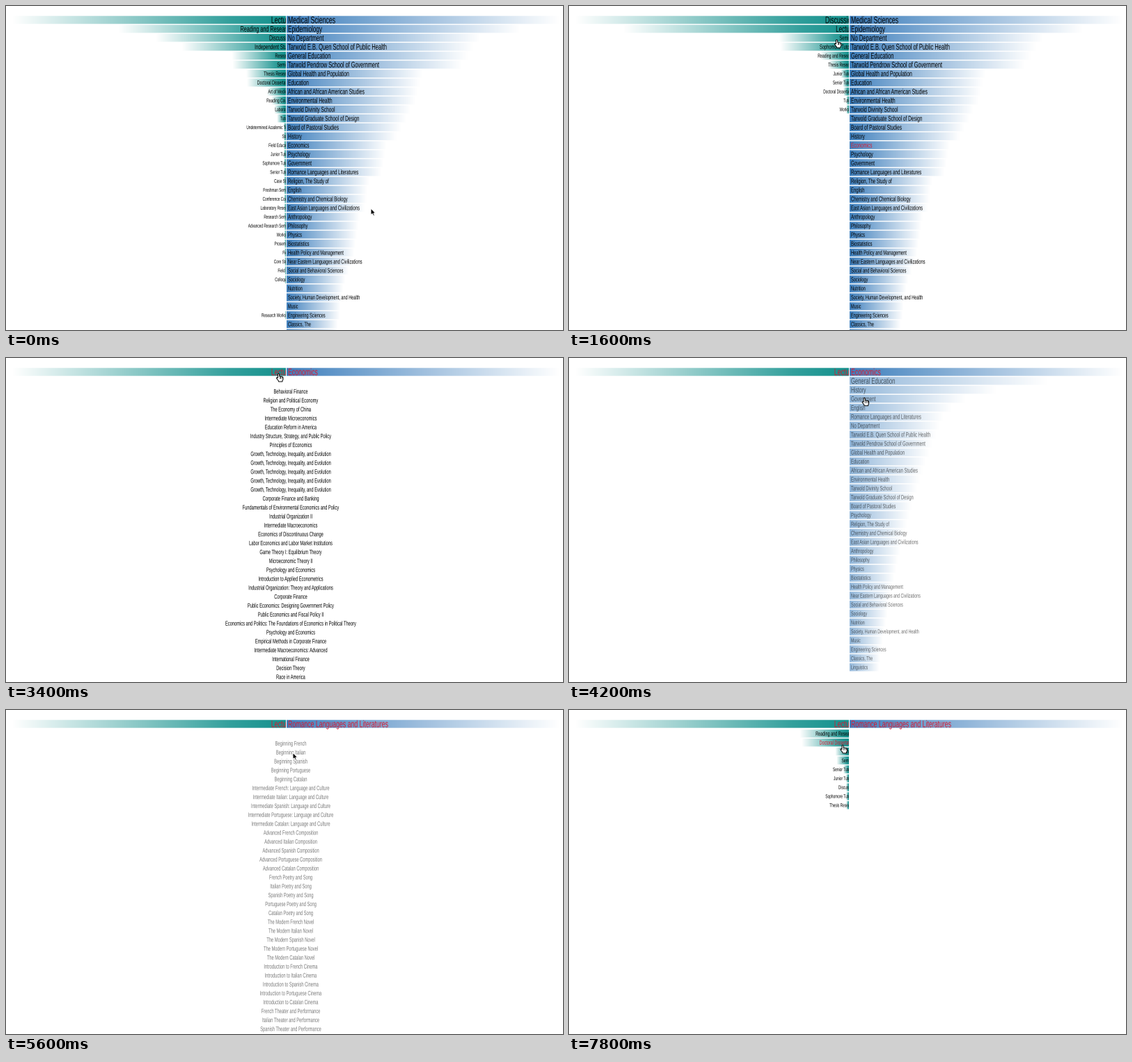
Write a matplotlib script that moves like this. It is 800x466 px and loops after 8 s.

```python
import numpy as np
import matplotlib.pyplot as plt
from matplotlib.animation import FuncAnimation
from matplotlib.lines import Line2D
from matplotlib.patches import PathPatch, Polygon, Rectangle
from matplotlib.path import Path
from matplotlib.textpath import TextPath
from matplotlib.transforms import Affine2D

W, H = 800, 466
FRAMES, STEP = 40, 200
MID, ROW, TOP, BAR = 402, 12.87, 20, 11.4
NARROW = 0.63  # one condensed face for all text
RED = "#d81830"
TEAL, BLUE = np.array([20, 145, 141]), np.array([62, 127, 189])

LEFT_ALL = [
    ("Lecture", 400), ("Reading and Research", 245), ("Discussion", 190),
    ("Independent Study", 152), ("Research", 79), ("Seminar", 78),
    ("Thesis Research", 58), ("Doctoral Dissertation", 57),
    ("Art of Medicine", 28), ("Reading Course", 21), ("Laboratory", 17),
    ("Tutorial", 13), "Undetermined Academic Topic", "Studio",
    "Field Education", "Junior Tutorial", "Sophomore Tutorial",
    "Senior Tutorial", "Case Study", "Freshman Seminar", "Conference Course",
    "Laboratory Research", "Research Seminar", "Advanced Research Seminar",
    "Workshop", "Proseminar", "Fields", "Core Studio", "Field Trip",
    "Colloquium", "", "", "", "Research Workshop",
]
LEFT_ECON = [
    ("Discussion", 400), ("Lecture", 330), ("Seminar", 102),
    ("Sophomore Tutorial", 100), ("Reading and Research", 42),
    ("Thesis Research", 30), ("Junior Tutorial", 12), ("Senior Tutorial", 9),
    ("Doctoral Dissertation", 8), "Tutorial", "Workshop",
]
LEFT_ROM = [
    ("Lecture", 400), ("Reading and Research", 72),
    ("Doctoral Dissertation", 69), ("Tutorial", 20), ("Seminar", 18),
    ("Senior Tutorial", 8), "Junior Tutorial", "Discussion",
    "Sophomore Tutorial", "Thesis Research",
]
RIGHT_ALL = [
    ("Medical Sciences", 400), ("Epidemiology", 342), ("No Department", 284),
    ("Tarwold E.B. Quen School of Public Health", 274),
    ("General Education", 266), ("Tarwold Pendrow School of Government", 257),
    ("Global Health and Population", 200), ("Education", 196),
    ("African and African American Studies", 193),
    ("Environmental Health", 190), ("Tarwold Divinity School", 182),
    ("Tarwold Graduate School of Design", 176),
    ("Board of Pastoral Studies", 169), ("History", 162), ("Economics", 147),
    ("Psychology", 145), ("Government", 143),
    ("Romance Languages and Literatures", 140),
    ("Religion, The Study of", 122), ("English", 119),
    ("Chemistry and Chemical Biology", 118),
    ("East Asian Languages and Civilizations", 115), ("Anthropology", 108),
    ("Philosophy", 106), ("Physics", 104), ("Biostatistics", 102),
    ("Health Policy and Management", 100),
    ("Near Eastern Languages and Civilizations", 97),
    ("Social and Behavioral Sciences", 92), ("Sociology", 87),
    ("Nutrition", 84), ("Society, Human Development, and Health", 82),
    ("Music", 80), ("Engineering Sciences", 79), ("Classics, The", 76),
    ("Linguistics", 75),
]
ECON_COURSES = [
    "Behavioral Finance", "Religion and Political Economy",
    "The Economy of China", "Intermediate Microeconomics",
    "Education Reform in America",
    "Industry Structure, Strategy, and Public Policy",
    "Principles of Economics",
    *["Growth, Technology, Inequality, and Evolution"] * 5,
    "Corporate Finance and Banking",
    "Fundamentals of Environmental Economics and Policy",
    "Industrial Organization II", "Intermediate Macroeconomics",
    "Economics of Discontinuous Change",
    "Labor Economics and Labor Market Institutions",
    "Game Theory I: Equilibrium Theory", "Microeconomic Theory II",
    "Psychology and Economics", "Introduction to Applied Econometrics",
    "Industrial Organization: Theory and Applications", "Corporate Finance",
    "Public Economics: Designing Government Policy",
    "Public Economics and Fiscal Policy II",
    "Economics and Politics: The Foundations of Economics in Political Theory",
    "Psychology and Economics", "Empirical Methods in Corporate Finance",
    "Intermediate Macroeconomics: Advanced", "International Finance",
    "Decision Theory", "Race in America",
]
TONGUES = ["French", "Italian", "Spanish", "Portuguese", "Catalan"]
TOPICS = [
    "Beginning {}", "Intermediate {}: Language and Culture",
    "Advanced {} Composition", "{} Poetry and Song", "The Modern {} Novel",
    "Introduction to {} Cinema", "{} Theater and Performance",
]
ROM_COURSES = [t.format(n) for t in TOPICS for n in TONGUES][:33]


def placed(items, shift=0.0):
    """Map each label to its row and bar width."""
    out = {}
    for i, item in enumerate(items):
        name, width = item if isinstance(item, tuple) else (item, 5 - i * 0.12)
        if name:
            out[name] = (i + (shift if i else 0), width)
    return out


def by_lecture():
    first = [("Economics", 400), ("General Education", 290),
             ("History", 215), ("Government", 170), ("English", 150),
             ("Romance Languages and Literatures", 138)]
    used = {n for n, _ in first}
    rest = [n for n, _ in RIGHT_ALL[2:] if n not in used]
    return first + [(n, 138 * 0.96 ** (i + 1)) for i, n in enumerate(rest)]


ONE_LEFT = placed([("Lecture", 400)])
LEFT_START = placed(LEFT_ALL)
RIGHT_START = placed(RIGHT_ALL)
LEFT_MOVES = [(600, 1350, placed(LEFT_ECON)), (1850, 2600, ONE_LEFT),
              (6300, 6950, placed(LEFT_ROM, 0.08))]
RIGHT_MOVES = [(1850, 2600, placed([("Economics", 400)])),
               (3800, 4500, placed(by_lecture())),
               (4630, 5380,
                placed([("Romance Languages and Literatures", 400)]))]
RED_SINCE = {"Economics": 600, "Lecture": 1850, "Doctoral Dissertation": 7600,
             "Romance Languages and Literatures": 4630}
COURSES = [(ECON_COURSES, 2600, 3100, 3800), (ROM_COURSES, 5380, 5800, 6150)]

# time, x, y of the pointer tip
PATH = np.array([
    (0, 524, 291), (400, 440, 215), (600, 424, 200), (1200, 424, 200),
    (1600, 384.5, 48.5), (1800, 384, 32), (3000, 384, 32), (3400, 391.5, 22.5),
    (3700, 418, 20), (3900, 420, 20), (4400, 427, 82), (5400, 427, 82),
    (6000, 382, 20), (6200, 376.5, 17.5), (7200, 376.5, 17.5),
    (7600, 393, 50.5)])
ARROW = np.array([(0, 0), (0, 9.6), (2.2, 7.6), (3.8, 11), (5.4, 10.3),
                  (3.9, 7), (6.8, 7)])
HAND = np.array([
    (-1, 0.6), (0, 0), (1, 0.6), (1.2, 4), (2.5, 3.6), (3.4, 4.4), (4.6, 4.1),
    (6.3, 5), (6.6, 6.5), (6.4, 8.5), (5.5, 10), (5.5, 11.5),
    (0, 11.5), (-0.3, 10), (-2.2, 7.8), (-3.2, 6), (-2.2, 5.4), (-1, 6.3)])


def ease(t):
    return 4 * t ** 3 if t < 0.5 else 1 - 4 * (1 - t) ** 3


def ramp(ms, start, end):
    return min(max((ms - start) / (end - start), 0), 1)


def bars_at(ms, state, moves):
    """List (label, row, width, alpha) for one side."""
    for start, end, after in moves:
        t = ramp(ms, start, end)
        if t < 1:
            break
        state = after
    else:
        t = 0
    if t <= 0:
        return [(n, r, w, 1) for n, (r, w) in state.items()]
    p, out = ease(t), []
    for name, (row, width) in state.items():
        if name in after:
            row2, width2 = after[name]
            out.append((name, row + (row2 - row) * p,
                        width + (width2 - width) * p, 1))
        elif t < 0.4:
            out.append((name, row, width, 1 - 2.5 * t))
    out += [(n, r, w, t) for n, (r, w) in after.items() if n not in state]
    return out


fig = plt.figure(figsize=(W / 100, H / 100), dpi=100, facecolor="white")
ax = fig.add_axes([0, 0, 1, 1])
ax.axis("off")
canvas = ax.imshow(np.ones((H, W, 3)), extent=(0, W, H, 0),
                   interpolation="nearest", aspect="auto")
ax.set_xlim(0, W)
ax.set_ylim(H, 0)
left_half = Rectangle((0, 0), MID, H, transform=ax.transData)
glyphs, drawn = {}, []
xs, ys = np.arange(W) + 0.5, np.arange(H)


def show(artist):
    # add_artist skips the slow data-limit update of add_patch
    ax.add_artist(artist)
    drawn.append(artist)
    return artist


def paint_bar(img, side, row, width, alpha):
    mid = TOP + row * ROW
    top, bottom = mid - BAR / 2, mid + BAR / 2
    a, b = max(int(top), 0), min(int(bottom) + 1, H)
    if a >= b:
        return
    reach = int(width) + 2
    cols = slice(max(MID - reach, 0), MID) if side < 0 else slice(
        MID + 1, min(MID + reach, W))
    cover = np.clip(np.minimum(ys[a:b] + 1, bottom)
                    - np.maximum(ys[a:b], top), 0, 1)
    dist = (xs[cols] - MID) * side / max(width, 1)
    if side < 0:
        ink = np.interp(dist, [0, 0.2, 0.98], [1, 0.87, 0])
    else:
        ink = np.interp(dist, [0, 0.98], [1, 0])
    tint = 1 - ink[:, None] * (1 - (TEAL if side < 0 else BLUE) / 255)
    mix = (cover[:, None] * (dist < 1) * alpha)[:, :, None]
    img[a:b, cols] = img[a:b, cols] * (1 - mix) + tint * mix


def glyph(text):
    if text not in glyphs:
        raw = TextPath((0, 0), text, size=1, prop={"family": "Liberation Sans"})
        path = Path(raw.vertices, raw.codes)
        glyphs[text] = path, path.vertices[:, 0].max() + 0.04
    return glyphs[text]


def write(text, x, y, size, align, color="black", alpha=1.0, clip=None):
    path, length = glyph(text)
    x -= length * size * NARROW * align
    place = Affine2D().scale(size * NARROW, -size).translate(x, y + size * 0.345)
    patch = show(PathPatch(path, fc=color, lw=0, alpha=alpha,
                           transform=place + ax.transData, zorder=3))
    if clip is not None:
        patch.set_clip_path(clip)


def draw_side(img, ms, side, bars):
    for name, row, width, alpha in bars:
        paint_bar(img, side, row, width, alpha)
        red = ms >= RED_SINCE.get(name, 1e9)
        size = (4.75 + 0.01 * width) / NARROW
        x, align, clip = (410, 1, left_half) if side < 0 else (405, 0, None)
        write(name, x, TOP + row * ROW, size, align,
              RED if red else "black", alpha, clip)


def draw_pointer(ms):
    x, y = [np.interp(ms, PATH[:, 0], PATH[:, k]) for k in (1, 2)]
    hand = 500 <= ms < 4630 or ms >= 5800
    shape, fill, edge = ((HAND, "white", "black") if hand
                         else (ARROW, "black", "white"))
    show(Polygon(shape + [x, y], fc=fill, ec=edge, lw=0.7, zorder=5))
    if hand:
        for dx in (1.2, 2.9, 4.5):
            show(Line2D([x + dx] * 2, [y + 4, y + 6.5], color="black",
                        lw=0.5, zorder=6))


def draw(i):
    ms = i * STEP
    while drawn:
        drawn.pop().remove()
    img = np.ones((H, W, 3))
    draw_side(img, ms, -1, bars_at(ms, LEFT_START, LEFT_MOVES))
    draw_side(img, ms, 1, bars_at(ms, RIGHT_START, RIGHT_MOVES))
    canvas.set_data(img)
    for titles, start, full, end in COURSES:
        if start < ms < end:
            for k, title in enumerate(titles):
                write(title, 409, 48 + 12.83 * k, 9.1, 0.5,
                      alpha=ramp(ms, start, full))
    draw_pointer(ms)
    return [canvas, *drawn]


anim = FuncAnimation(fig, draw, frames=FRAMES, interval=STEP,
                     init_func=lambda: draw(0), repeat=True, repeat_delay=0)
plt.show()
```
